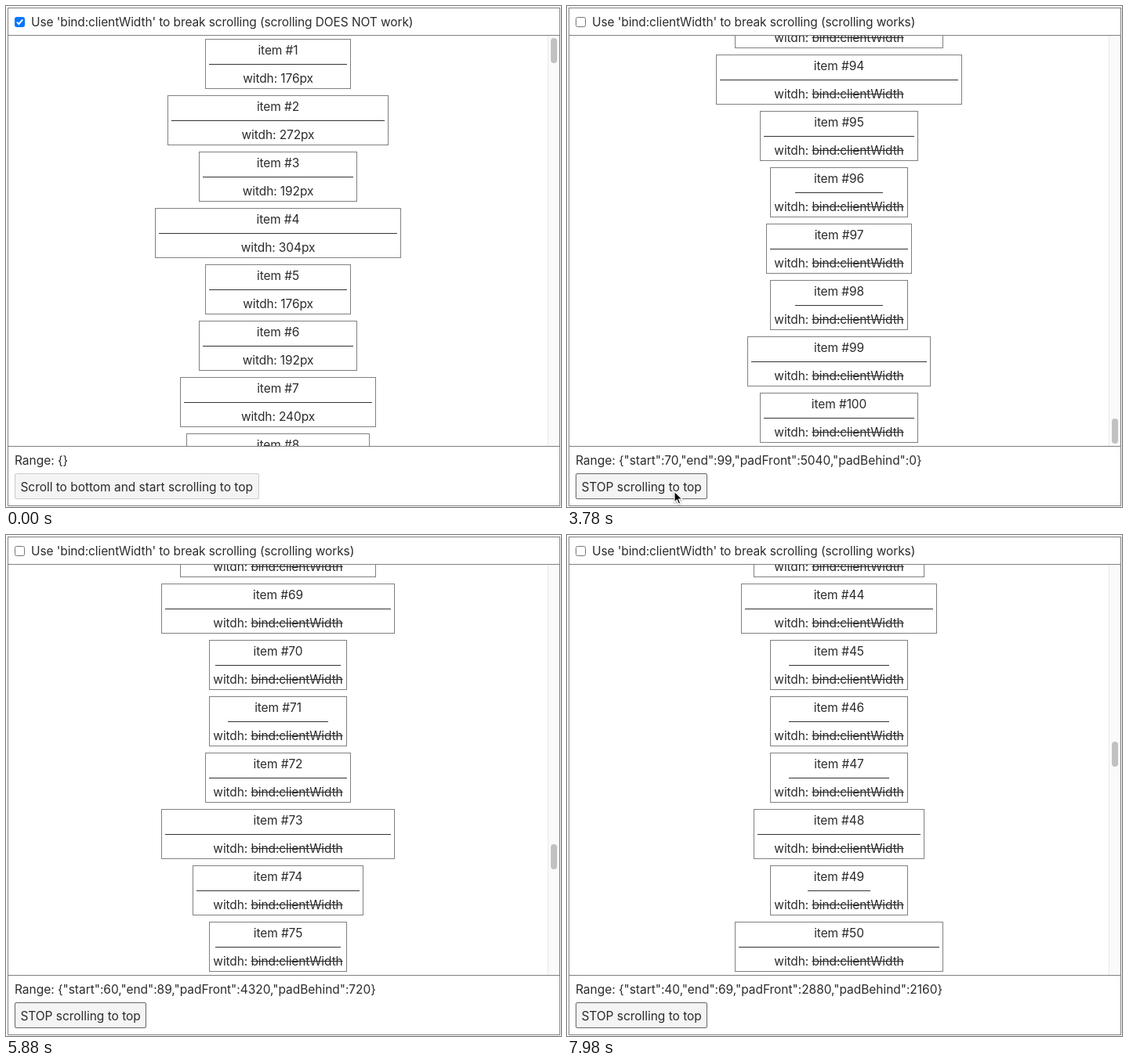
These frames come from a looping animation (708 px wide and 640 px high, 8 s). An HTML page:

```html
<!DOCTYPE html>
<html lang="en">
<head>
<meta charset="utf-8">
<title>Virtual list scrolling</title>
<style>
html, body { margin: 0; width: 100%; height: 100%; overflow: hidden; background: #fff; }
#stage { position: relative; width: 708px; height: 640px; overflow: hidden; background: #fff;
  font: 15.5px/20px Inter, Roboto, sans-serif; letter-spacing: -0.1px; color: #2b2b2b; white-space: pre; }
#stage div, #stage svg { position: absolute; box-sizing: border-box; }
#frame { left: 2px; top: 2px; width: 705px; height: 637px; border: 1px solid #808080; }
#view { left: 3px; top: 37px; width: 703px; height: 526px; overflow: hidden;
  border: solid #808080; border-width: 1px 0; }
.list { left: 0; top: 0; width: 688px; will-change: transform; }
.item { height: 64px; border: 1px solid #808080; text-align: center; }
.item div { left: 0; right: 0; }
.item .name { top: 4px; }
.item .size { top: 40px; }
#stage .item .rule { top: 31px; height: 1px; left: 50%; right: auto; transform: translateX(-50%);
  background: #333; }
#track { left: 688px; top: 0; width: 15px; height: 524px; background: #fafafa;
  border: solid #e8e8e8; border-width: 0 1px; }
#thumb { left: 692px; top: 3px; width: 8px; height: 32px; border-radius: 4px; background: #c1c1c1; }
#label { left: 32px; top: 11px; }
#range { left: 11px; top: 571px; letter-spacing: -0.03px; }
#button { left: 11px; top: 597px; height: 33px; padding: 7px 0 0 6.4px; letter-spacing: -0.03px;
  border: 1px solid #ccc; border-radius: 2px; }
#box { left: 11px; top: 13px; }
#cursor { left: -2px; top: -2px; overflow: visible; }
</style>
</head>
<body>
<div id="stage">
  <div id="frame"></div>
  <div id="view">
    <div class="list" id="measured"></div>
    <div class="list" id="plain"></div>
    <div id="track"></div>
    <div id="thumb"></div>
  </div>
  <svg id="box" width="14" height="14">
    <rect id="fill" x=".5" y="1.5" width="12" height="12" rx="2"/>
    <path id="tick" d="M3 7.6 5.4 10 10.2 4.4" fill="none" stroke="#fff" stroke-width="2"/>
  </svg>
  <div id="label"></div>
  <div id="range"></div>
  <div id="button"></div>
  <svg id="cursor" width="16" height="22">
    <path d="M2 2V16L5.2 13.1 7.3 18 9.7 17 7.6 12.2H12Z" fill="#000" stroke="#fff" stroke-width="1.2"
      style="filter: drop-shadow(0 1px 1px rgba(0,0,0,.35))"/>
  </svg>
</div>
<script>
const $ = id => document.getElementById(id);
const LOOP = 8000, TICK = 70, PITCH = 72, DASH = 16, COUNT = 100, BATCH = 10;
const MAX = COUNT * PITCH - 524, JUMP = 180, BEAT = 210;
const HOVER = 840, PRESS = 1680, TOGGLE = 1750, LEAVE = 2730, CLICK = 3640, RUN = 3780, EXIT = 5250;

let seed = 7;
const random = () => (seed = seed * 16807 % 2147483647) / 2147483647;

function fillList(list, opening, min, sizeText) {
  for (let i = 0; i < COUNT; i++) {
    const rule = DASH * (opening[i] || 5 + Math.floor(random() * 15));
    const width = Math.max(rule + 10, min);
    const item = document.createElement('div');
    item.className = 'item';
    item.style.cssText = `left:${344 - width / 2}px;top:${4 + i * PITCH}px;width:${width}px`;
    item.innerHTML = `<div class="name">item #${i + 1}</div>
      <div class="rule" style="width:${rule}px"></div><div class="size">witdh: ${sizeText(rule)}</div>`;
    list.append(item);
  }
}
// Only the opening screen has chosen widths, in dashes
fillList($('measured'), [11, 17, 12, 19, 11, 12, 15, 14], 0, rule => rule + 'px');
fillList($('plain'), [17, 15, 16, 8, 14, 19, 16, 8], 176, () => '<s>bind:clientWidth</s>');

const easeOut = p => 1 - (1 - p) ** 3;
const easeInOut = p => p * p * (3 - 2 * p);

function glide(t, start, end, from, to, ease) {
  const k = ease(Math.min(1, (t - start) / (end - start)));
  return from.map((v, i) => Math.round(v + (to[i] - v) * k));
}

function cursorAt(time) {
  const t = Math.floor(time / TICK) * TICK;
  if (t < 350 || t > EXIT + TICK) return null;
  if (t < LEAVE) return glide(t, 350, 1400, [331, 577], [186, 26], easeOut);
  if (t <= EXIT) return glide(t, LEAVE, CLICK, [184, 51], [137, 620], easeInOut);
  return [134, 631];
}

function scrollAt(t) {
  return t < RUN ? 0 : MAX - Math.floor((t - RUN) / BEAT) * JUMP;
}

function rangeAt(scroll) {
  const first = Math.floor((scroll / PITCH - 1) / BATCH) * BATCH;
  const start = Math.min(COUNT - 3 * BATCH, first), end = start + 3 * BATCH - 1;
  return JSON.stringify({ start, end, padFront: start * PITCH, padBehind: (COUNT - 1 - end) * PITCH });
}

function checkInk(on, hover, held) {
  if (on) return held ? '#3793ff' : hover ? '#005cc8' : '#0075ff';
  return held ? '#8d8d8d' : hover ? '#4f4f4f' : '#767676';
}

function setText(id, text) {
  if ($(id).textContent !== text) $(id).textContent = text;
}

const show = (id, on) => { $(id).style.display = on ? '' : 'none'; };
const move = (id, x, y) => { $(id).style.transform = `translate(${x}px, ${y}px)`; };

function draw(t) {
  const on = t < TOGGLE, running = t >= RUN, clicked = t >= CLICK, scroll = scrollAt(t);

  show('measured', on);
  show('plain', !on);
  move('plain', 0, -scroll);
  move('thumb', 0, Math.floor(486 * scroll / MAX));

  const ink = checkInk(on, t >= HOVER && t < LEAVE, t >= PRESS && t < TOGGLE + TICK);
  $('fill').setAttribute('stroke', ink);
  $('fill').setAttribute('fill', on ? ink : '#fff');
  show('tick', on);

  setText('label', `Use 'bind:clientWidth' to break scrolling (scrolling ${on ? 'DOES NOT work' : 'works'})`);
  setText('range', 'Range: ' + (running ? rangeAt(scroll) : '{}'));
  setText('button', running ? 'STOP scrolling to top' : 'Scroll to bottom and start scrolling to top');
  Object.assign($('button').style, {
    width: running ? '168px' : '312px',
    borderColor: clicked ? '#666' : '#ccc',
    background: clicked && !running ? '#ddd' : '#f4f4f4'
  });

  const at = cursorAt(t);
  show('cursor', at);
  if (at) move('cursor', ...at);
}

const begin = performance.now();
function loop() {
  draw((performance.now() - begin) % LOOP);
  requestAnimationFrame(loop);
}
draw(0);
requestAnimationFrame(loop);
</script>
</body>
</html>
```
